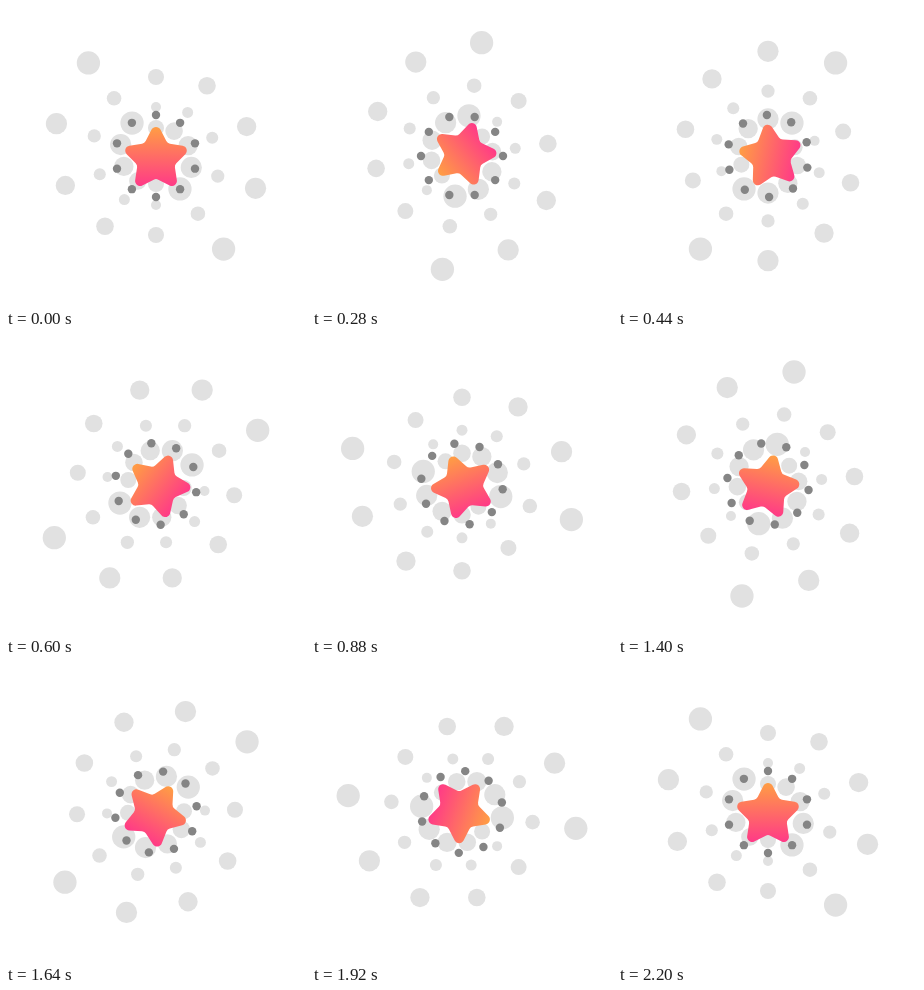
Recreate the animation shown at these times as an HTML page with a canvas. Size 300 by 300 pixels, loop 2240 ms.

```html
<!DOCTYPE html>
<html>
<head>
<meta charset="utf-8">
<style>
html, body { margin: 0; width: 100%; height: 100%; overflow: hidden; background: #fff; }
canvas { display: block; width: 100vw; height: 100vh; }
</style>
</head>
<body>
<canvas id="stage"></canvas>
<script>
const canvas = document.getElementById('stage');
const ctx = canvas.getContext('2d');
const SIZE = 300, STEP = 40, STEPS = 56, TURN = STEPS - 1;
const RAD = Math.PI / 180;

// [step, degrees, degrees per step]: fast, slow, fast over two turns
const starSpin = [
  [0, 0, 61], [7, 232, 16], [15, 309, 5.5], [29, 358.5, 2.5],
  [41, 390.5, 4], [48, 468, 16.5], [55, 720, 71]
];
const ringSpin = [
  [0, 0, 61], [7, 234, 16.5], [15, 317.5, 5.8], [29, 370.6, 2.8],
  [41, 406, 4], [48, 472.5, 15.5], [55, 720, 71]
];

function spin(keys, x) {
  let i = 0;
  while (i < keys.length - 2 && x >= keys[i + 1][0]) i++;
  const [x0, y0, m0] = keys[i], [x1, y1, m1] = keys[i + 1];
  const h = x1 - x0, u = (x - x0) / h, v = 1 - u;
  return y0 + (y1 - y0) * u * u * (3 - 2 * u) + h * u * v * (m0 * v - m1 * u);
}

function dot(deg, dist, r) {
  const a = deg * RAD;
  ctx.beginPath();
  ctx.arc(dist * Math.cos(a), dist * Math.sin(a), r, 0, 2 * Math.PI);
  ctx.fill();
}

function burst(turn) {
  ctx.fillStyle = '#e1e1e1';
  for (let i = 0; i < 10; i++) {
    const a = turn - 90 + 36 * i;
    const k = Math.pow(1.0984, i % 5);
    dot(a, 28 * k, 8 * k);
    dot(a, 49 * k, 5 * k);
    dot(a, 79 * k, 8 * k);
  }
}

function ring(turn) {
  ctx.fillStyle = '#858585';
  for (let i = 0; i < 10; i++) dot(turn - 90 + 36 * i, 41, 4.2);
}

function star(turn) {
  const pts = [];
  for (let i = 0; i < 10; i++) {
    const a = (36 * i - 90) * RAD, r = i % 2 ? 19.5 : 38;
    pts.push([r * Math.cos(a), 3 + r * Math.sin(a)]);
  }
  ctx.save();
  ctx.rotate(turn * RAD);
  const fill = ctx.createLinearGradient(0, -30, 0, 30);
  fill.addColorStop(0, '#ff9f43');
  fill.addColorStop(1, '#ff3a87');
  ctx.fillStyle = fill;
  ctx.beginPath();
  ctx.moveTo((pts[9][0] + pts[0][0]) / 2, (pts[9][1] + pts[0][1]) / 2);
  pts.forEach((p, i) => {
    const n = pts[(i + 1) % 10];
    ctx.arcTo(p[0], p[1], n[0], n[1], 5);
  });
  ctx.closePath();
  ctx.fill();
  ctx.restore();
}

function draw(ms) {
  const w = Math.round(innerWidth * devicePixelRatio);
  const h = Math.round(innerHeight * devicePixelRatio);
  if (canvas.width !== w || canvas.height !== h) {
    canvas.width = w;
    canvas.height = h;
  }
  const step = Math.floor(ms / STEP) % STEPS;
  ctx.setTransform(w / SIZE, 0, 0, h / SIZE, w / 2, h / 2);
  ctx.fillStyle = '#fff';
  ctx.fillRect(-SIZE / 2, -SIZE / 2, SIZE, SIZE);
  burst(360 * step / TURN);
  ring(spin(ringSpin, step));
  star(spin(starSpin, step));
}

const start = performance.now();
function tick() {
  draw(performance.now() - start);
  requestAnimationFrame(tick);
}
tick();
</script>
</body>
</html>
```
